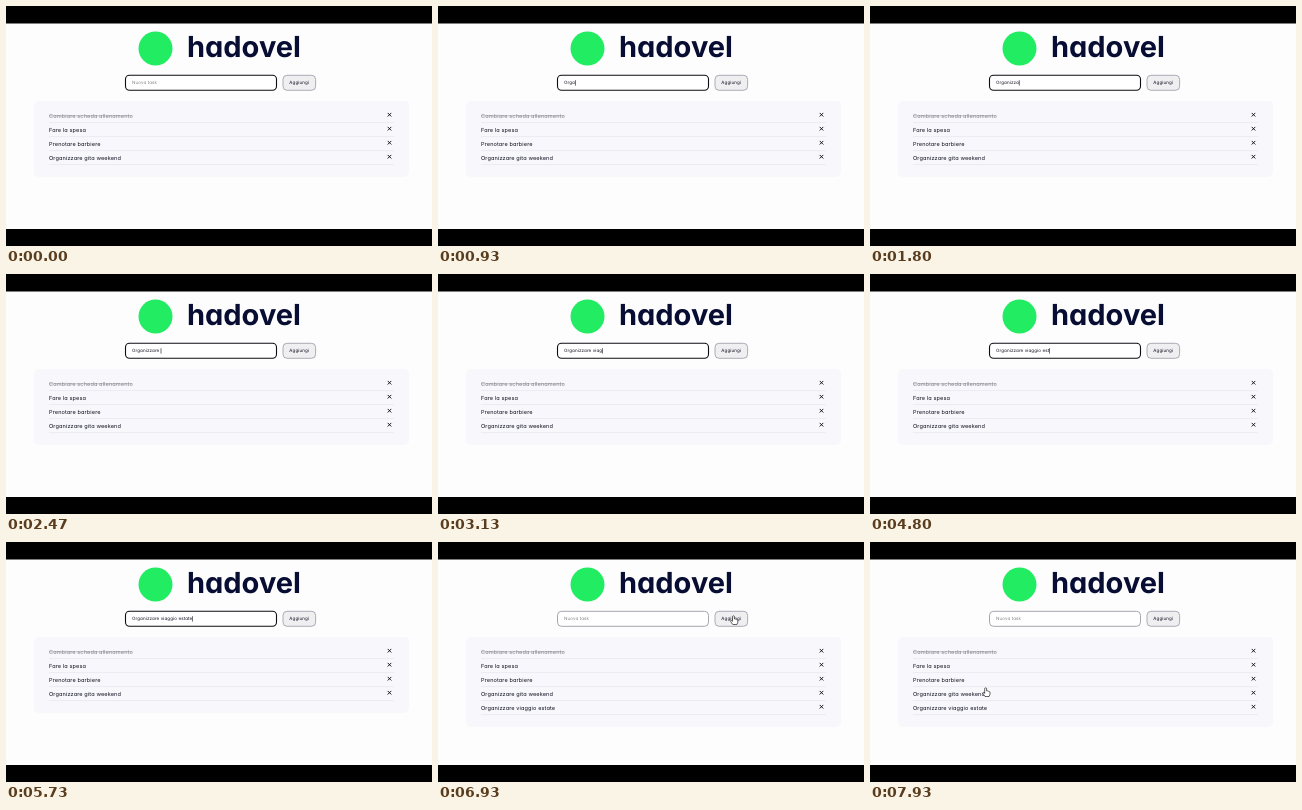
These frames come from a looping animation (426 by 240 pixels, 8 s). An HTML page:

```html
<!DOCTYPE html>
<html lang="it">
<head>
<meta charset="utf-8">
<title>Lista task</title>
<style>
  html, body { margin: 0; width: 100%; height: 100%; overflow: hidden; background: #000; }
  svg { display: block; width: 100%; height: 100%; }
  text {
    font-family: Inter, "Open Sans", sans-serif;
    font-feature-settings: "cv11";
    text-rendering: geometricPrecision;
    fill: #0d0f1e;
    white-space: pre;
  }
  .brand { font-size: 29px; font-weight: 700; fill: #080e33; }
  .field { font-size: 4.5px; letter-spacing: .1px; }
  .hint { fill: #85858c; }
  .row text { font-size: 5.55px; letter-spacing: .12px; }
  .row .done { fill: #85858c; }
  .row line { stroke: #e3e4ec; stroke-width: .6; }
  .row .cross, .strike { fill: none; stroke: #101018; stroke-width: .95; }
  .row .strike { stroke: #85858c; stroke-width: .5; }
  .mouse path { fill: #fff; stroke: #111; stroke-width: .65; stroke-linejoin: round; }
</style>
</head>
<body>
<svg viewBox="0 0 426 240" preserveAspectRatio="none">
  <rect width="426" height="240" fill="#000"/>
  <rect y="17.5" width="426" height="205.5" fill="#fdfdfe"/>
  <circle cx="149.5" cy="42.5" r="17" fill="#22ec62"/>
  <text class="brand" x="181" y="51">hadovel</text>

  <rect id="input" x="119.5" y="69.3" width="151" height="15" rx="4" fill="#fff"/>
  <text id="typed" class="field" x="126" y="78.4"></text>
  <rect id="caret" y="74.2" width=".6" height="5.4" fill="#111"/>
  <rect x="277" y="69.3" width="32.6" height="15" rx="4" fill="#efeff2" stroke="#9a9aa4" stroke-width=".8"/>
  <text class="field" x="293.2" y="78.4" text-anchor="middle">Aggiungi</text>

  <rect id="panel" x="28" y="95" width="375" rx="5" fill="#f8f8fc"/>
  <g id="rows"></g>

  <g id="mouse" class="mouse">
    <path id="hand" d="M-1 -4 Q0 -5 .9 -4 V-1.4 Q1.7 -1.9 2.2 -1.1 Q3 -1.5 3.4 -.6 Q4.3 -.8 4.3 .3 V2 L3.4 4.2 H-.7 L-2.8 1.2 Q-3.2 0 -2.1 .1 L-1 1 Z"/>
    <path id="arrow" d="M-1 -4 V3.4 L.7 1.8 L1.9 4.4 L3 3.9 L1.8 1.4 H4 Z"/>
    <path id="beam" d="M-1.3 -3.5 H1.3 M0 -3.5 V3.5 M-1.3 3.5 H1.3"/>
  </g>
</svg>
<script>
const LOOP = 8000, CLICK = 6700, LAST_KEY = 5300;
const TASK = "Organizzare viaggio estate";
const TASKS = ["Cambiare scheda allenamento", "Fare la spesa", "Prenotare barbiere",
  "Organizzare gita weekend", TASK];

// [time, value...] keys
const KEYS = [[250, 0], [1770, 9], [3100, 16], [3880, 20], [LAST_KEY, 26]];
const PATH = [[5850, 235, 79], [6400, 295.5, 78.3], [7050, 295.5, 78.3], [7750, 115.7, 150.3]];

const $ = id => document.getElementById(id);
const show = (el, on) => el.setAttribute("visibility", on ? "visible" : "hidden");
const set = (el, attrs) => { for (const k in attrs) el.setAttribute(k, attrs[k]); };
const smooth = u => u * u * (3 - 2 * u);

function track(keys, t, ease = u => u) {
  if (t <= keys[0][0]) return keys[0].slice(1);
  for (let i = 1; i < keys.length; i++) {
    const a = keys[i - 1], b = keys[i];
    if (t < b[0]) {
      const u = ease((t - a[0]) / (b[0] - a[0]));
      return a.slice(1).map((v, j) => v + (b[j + 1] - v) * u);
    }
  }
  return keys[keys.length - 1].slice(1);
}

function row(name, i) {
  const y = 109.6 + i * 14;
  return `<g class="row">
    <text x="43" y="${y + 2}"${i ? "" : ' class="done"'}>${name}</text>
    ${i ? "" : `<path class="strike" d="M43 ${y + .2}h83"/>`}
    <path class="cross" d="M381.7 ${y - 2.7}l3.6 3.6m0 -3.6l-3.6 3.6"/>
    <line x1="43" x2="388" y1="${y + 7}" y2="${y + 7}"/>
  </g>`;
}

$("rows").innerHTML = TASKS.map(row).join("");
const added = $("rows").lastElementChild;

function pointer(x, y) {
  const inField = x < 270 && y > 69 && y < 85;
  const onButton = x > 277 && x < 310 && y > 69 && y < 85;
  return inField ? "beam" : onButton || y > 103 ? "hand" : "arrow";
}

function draw(t) {
  const sent = t >= CLICK;
  const count = sent ? 0 : Math.floor(track(KEYS, t)[0] + 1e-6);
  const typed = $("typed");
  typed.textContent = count ? TASK.slice(0, count) : "Nuova task";
  typed.setAttribute("class", count ? "field" : "field hint");

  const typing = count > 0 && t < LAST_KEY;
  const blinkOn = (t - LAST_KEY) % 1000 < 500;
  show($("caret"), count > 0 && (typing || blinkOn));
  if (count) $("caret").setAttribute("x", 126 + typed.getComputedTextLength());

  set($("input"), { stroke: sent ? "#90909a" : "#0c0c12", "stroke-width": sent ? .8 : 1.1 });
  show(added, sent);
  $("panel").setAttribute("height", sent ? 90 : 76);

  const [x, y] = track(PATH, t, smooth);
  const kind = pointer(x, y);
  $("mouse").setAttribute("transform", `translate(${x} ${y})`);
  for (const id of ["hand", "arrow", "beam"]) show($(id), t >= PATH[0][0] && id === kind);
}

const start = performance.now();
function tick() {
  draw((performance.now() - start) % LOOP);
  requestAnimationFrame(tick);
}
tick();
</script>
</body>
</html>
```
